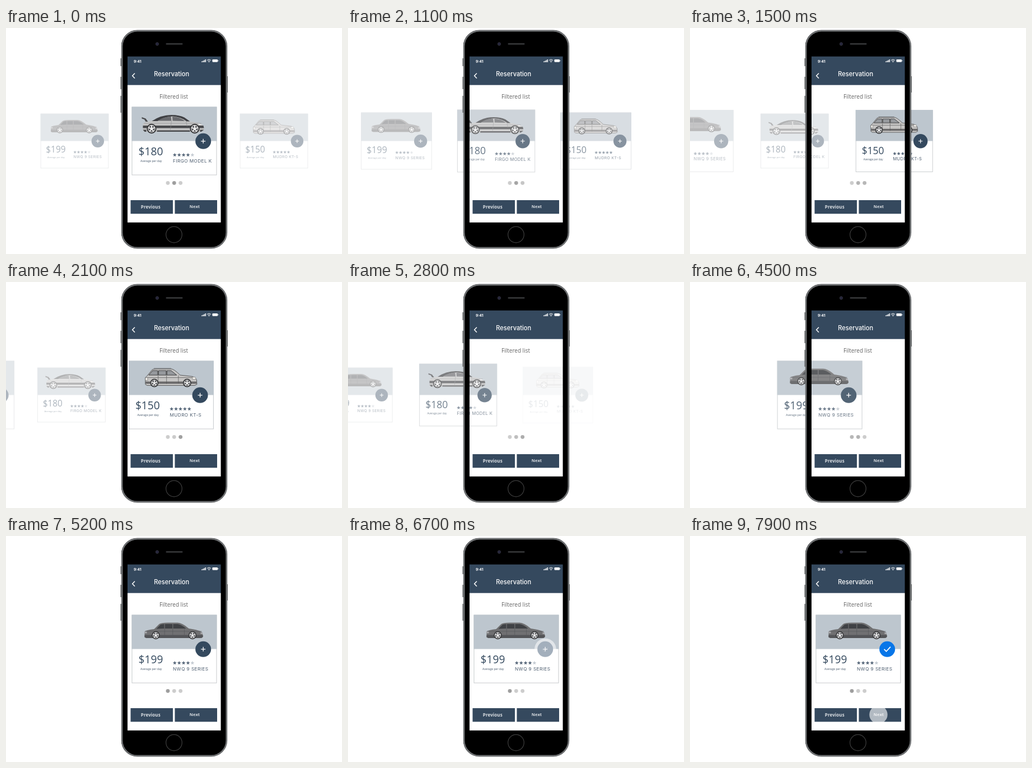
An HTML page that plays this animation: 600 px wide and 403 px high, repeating every 8000 ms.

```html
<!DOCTYPE html>
<html lang="en">
<head>
<meta charset="utf-8">
<title>Reservation carousel</title>
<style>
  html, body { margin: 0; width: 100%; height: 100%; overflow: hidden; background: #fff; }
  svg { display: block; width: 100vw; height: 100vh; }
  text { font-family: "Open Sans", sans-serif; }
  .ui, .name { font-family: Inter, sans-serif; }
  .ui { fill: #fff; }
  .button { font-weight: 700; fill: #d9dde1; text-anchor: middle; letter-spacing: .1px; }
  .price { font-size: 19.2px; fill: #34495e; }
  .note { font-size: 5.1px; fill: #46586b; }
  .name { font-size: 8.2px; letter-spacing: .45px; fill: #4c5c6e; }
</style>
</head>
<body>
<svg viewBox="0 0 600 403">
  <defs>
    <g id="wheel">
      <circle r="8" fill="#333436"/>
      <circle r="5.7" fill="#55565a" stroke="#e6e6e6"/>
      <path d="M0 0V-5.500M0 0 5.200-1.700M0 0 3.200 4.500M0 0-3.200 4.500M0 0-5.200-1.700" stroke="#efefef" stroke-width="1.900"/>
    </g>
    <g id="limo">
      <path d="M-53-21V-31Q-50-34-36-35.500L-27-44.500Q-24-47-12-47H6Q14-47 26-36.500 46-34 50-29L51.500-22Q50-19.500 46-19.500H-50Z" fill="#707072"/>
      <path d="M-53-25H51V-22Q50-19.500 46-19.500H-50L-53-21Z" fill="#545558"/>
      <path d="M-32-36-25-43Q-23-44.500-18-44.500V-36.500ZM-16.500-44.500H-3.500V-36.500H-16.500ZM-2-44.500H6Q12-44 21-36.500H-2Z" fill="#3f4145"/>
      <path d="M-52-31.500H49M-17.200-44V-21M-2.800-44V-21M18-36V-22" fill="none" stroke="#58595c" stroke-width=".7"/>
      <path d="M47-30 50.500-28.500V-26.500H47ZM-53-31H-49V-28H-53Z" fill="#a9aaad"/>
      <use href="#wheel" transform="translate(-33 -24.500) scale(.9)"/>
      <use href="#wheel" transform="translate(32.500 -24.500) scale(.9)"/>
    </g>
    <g id="coupe">
      <path d="M-56-19V-30Q-55-33-49-34L-36-37Q-22-46.500-5-46.500 9-46.500 18-42L28-35Q46-33 52-27L53-20 48-16.500H-53Z" fill="#c3c3c3"/>
      <path d="M-58-42.500-51-40-47-34.500H-51L-53.500-38.500-58-40Z" fill="#4a4b4d"/>
      <path d="M-40-35.500Q-24-46.500-5-46.500 9-46.500 18-42L28-35 22-35Q12-43-3-44-18-43.500-30-35.500Z" fill="#3f4044"/>
      <path d="M-29-36Q-19-43.500-6-43.500L-5-36ZM-3.500-43.500Q10-43 19-35.500L-3-36Z" fill="#696a6e"/>
      <path d="M-56-27.500H52L53-23H-56ZM-31-19H28V-16.500H-31ZM46-20H53L48-16.500H46ZM-56-20H-50V-16.500H-53Z" fill="#48494c"/>
      <path d="M-54-31.500H48M-5-36-7-20M21-35 23-26" fill="none" stroke="#88898b" stroke-width=".6"/>
      <path d="M43-31.500 50-28.500H44Z" fill="#f0f0f0"/>
      <use href="#wheel" transform="translate(-40.500 -22) scale(1.080)"/>
      <use href="#wheel" transform="translate(36.500 -22) scale(1.080)"/>
    </g>
    <g id="hatch">
      <path d="M-46-19V-31L-43-34-34-45Q-32-46.500-27-46.500H0Q5-46.500 16-35.500L38-33Q44-31 45.500-27L46-19 42-17H-43Z" fill="#c6c5c4" stroke="#4c4c4d" stroke-width=".9"/>
      <path d="M-40-35.500-33-43.500H-24V-35.500ZM-22.500-43.500H-9V-35.500H-22.500ZM-7.500-43.500H0L10-35.500H-7.500Z" fill="#96999d" stroke="#3e3f41" stroke-width="1"/>
      <path d="M-46-24H46V-20H-46Z" fill="#6a696a"/>
      <path d="M-45-31H43M-23.200-43V-20M-8.200-43V-20M13-35V-21M-31-47.500H0" fill="none" stroke="#555" stroke-width=".7"/>
      <path d="M38-32H43L44.500-28H38ZM-46-31H-42V-26H-46Z" fill="#f0eee9" stroke="#555" stroke-width=".5"/>
      <use href="#wheel" transform="translate(-30 -21.500) scale(.93)"/>
      <use href="#wheel" transform="translate(28.500 -21.500) scale(.93)"/>
    </g>
    <clipPath id="screen"><path d="M217 51H384V347H217Z"/></clipPath>
  </defs>

  <rect x="216" y="50" width="168" height="51.700" fill="#35495e"/>
  <text class="ui" x="228" y="61.500" font-size="6.700" font-weight="700">9:41</text>
  <g fill="#fff">
    <path d="M349 59.500H350.500V61H349ZM351.200 58.500H352.700V61H351.200ZM353.400 57.200H354.900V61H353.400ZM355.600 56H357.100V61H355.600Z"/>
    <rect x="368.500" y="56" width="9.500" height="4.800" rx="1.200"/>
    <rect x="378.500" y="57.500" width="1" height="1.800"/>
    <path d="M359 57.800Q362.500 54.600 366 57.800M360.500 59.300Q362.500 57.500 364.500 59.300" fill="none" stroke="#fff" stroke-width="1"/>
    <circle cx="362.500" cy="60.500" r=".8"/>
  </g>
  <path d="M230 80.700 225.700 85.200 230 89.700" fill="none" stroke="#fff" stroke-width="1.500"/>
  <text class="ui" x="295.700" y="86.200" font-size="11.100" font-weight="500" text-anchor="middle">Reservation</text>
  <text x="299.500" y="125.500" font-size="10" fill="#666" text-anchor="middle">Filtered list</text>

  <g id="dots"></g>
  <path d="M222.500 307H298V331.200H222.500ZM301.500 307H377V331.200H301.500Z" fill="#35495e"/>
  <text class="button" x="258.300" y="321.500" font-size="8">Previous</text>
  <text class="button" x="337" y="321" font-size="7.500">Next</text>

  <g id="cards"></g>
  <circle id="touch" fill="#fff" clip-path="url(#screen)"/>

  <path d="M204.500 54H207V68H204.500ZM204.500 87H207V109H204.500ZM204.500 121H207V151H204.500ZM393.500 86H396V115H393.500Z" fill="#66686a"/>
  <path d="M234 4H366A28 28 0 0 1 394 32V365A28 28 0 0 1 366 393H234A28 28 0 0 1 206 365V32A28 28 0 0 1 234 4ZM217 50.700V346.800H383.600V50.700Z" fill-rule="evenodd"/>
  <rect x="207.200" y="5" width="186.600" height="387" rx="27.500" fill="none" stroke="#5f6163" stroke-width="2.800"/>
  <rect x="207.200" y="5" width="186.600" height="387" rx="27.500" fill="none" stroke="#808284" stroke-width="1"/>
  <circle cx="270" cy="28.500" r="2.700" fill="#24243a" stroke="#363640" stroke-width=".8"/>
  <rect x="285.500" y="27" width="30" height="2.800" rx="1.400" fill="#333436"/>
  <circle cx="300" cy="368.500" r="14.300" fill="none" stroke="#3e3e3e" stroke-width="1.200"/>
</svg>

<script>
const LOOP = 8000, STEP = 100;
const CENTER = 300.5, MIDDLE = 201.5, SPACING = 178, MOVE_TIME = 1230;
const SMALL = 0.8, PALE = 0.4;

const cars = [
  { shape: 'limo', price: '$199', name: 'NWQ 9 SERIES', stars: 4 },
  { shape: 'coupe', price: '$180', name: 'FIRGO MODEL K', stars: 4 },
  { shape: 'hatch', price: '$150', name: 'MUDRO KT-S', stars: 5 }
];

// grow, show, shrink and fade are rates relative to the length of the move.
const moves = [
  { start: 916, from: 1, to: 2, grow: 1.13, show: 2.1, shrink: 2.8, fade: 2.9, left: PALE },
  { start: 2420, from: 2, to: 1, grow: 1.85, show: 1.5, shrink: 2.8, fade: 2.9, left: 0 },
  { start: 3940, from: 1, to: 0, grow: 2.2, show: 1.65, shrink: 2.8, fade: 5, left: 0 }
];

const $ = id => document.getElementById(id);
const clamp = v => Math.max(0, Math.min(1, v));
const mix = (a, b, k) => a + (b - a) * clamp(k);
const ramp = (t, a, b) => clamp((t - a) / (b - a));
// Almost linear, runs slightly past the goal and returns.
const overshoot = x => x * (1.35 - 0.35 * x ** 6);

function star(cx, cy, r) {
  const points = Array.from({ length: 10 }, (_, i) => {
    const a = i * Math.PI / 5, d = i % 2 ? r * 0.45 : r;
    return `${(cx + d * Math.sin(a)).toFixed(2)},${(cy - d * Math.cos(a)).toFixed(2)}`;
  });
  return points.join(' ');
}

function cardMarkup({ shape, price, name, stars }) {
  const rating = [0, 1, 2, 3, 4].map(i =>
    `<polygon points="${star(0.8 + 7.9 * i, 24.8, 3.6)}" fill="${i < stars ? '#5b6b7d' : '#c6ccd3'}"/>`).join('');
  return `<g class="card">
    <rect x="-75.5" y="-60.500" width="151" height="121" fill="#fff" stroke="#c6c9cc"/>
    <rect x="-76" y="-61" width="152" height="61" fill="#bdc6ce"/>
    <use href="#${shape}"/>
    <text class="price" x="-64" y="25.500">${price}</text>
    <text class="note" x="-60.5" y="37.500">Average per day</text>
    ${rating}
    <text class="name" x="-2.500" y="38.500">${name}</text>
    <g transform="translate(51.700 .3)" fill="none" stroke="#fff">
      <circle class="badge" r="14" fill="#34495e" stroke="none"/>
      <path class="plus" d="M-4 0H4M0-4V4" stroke-width="1.300"/>
      <path class="tick" d="M-5.500 0-1.700 4 5.800-4.200" stroke-width="1.800" opacity="0"/>
    </g>
  </g>`;
}

$('cards').innerHTML = cars.map(cardMarkup).join('');
$('dots').innerHTML = [289, 300.3, 311.7].map(x => `<circle cx="${x}" cy="276.300" r="3.400"/>`).join('');
const cards = [...document.querySelectorAll('.card')];
const dots = [...$('dots').children];
const badge = cards[0].querySelector('.badge');
const plus = cards[0].querySelector('.plus');
const tick = cards[0].querySelector('.tick');

function pose(i, move, x, t) {
  if (i === move.to) return [mix(SMALL, 1, move.grow * x), mix(PALE, 1, move.show * x)];
  if (i === move.from) return [mix(1, SMALL, move.shrink * x), mix(1, move.left, move.fade * x)];
  if (i === 2) return [SMALL, 0];
  // The far left card swells with the first move, then settles back.
  const swell = move === moves[0] ? clamp(move.grow * x) * (1 - ramp(t, 2125, 2420)) : 0;
  return [mix(SMALL, 1, swell), PALE];
}

function drawCarousel(t) {
  const move = moves.filter(m => t >= m.start).pop() || moves[0];
  const x = ramp(t, move.start, move.start + MOVE_TIME);
  const focus = move.from + (move.to - move.from) * overshoot(x);
  cards.forEach((card, i) => {
    const [scale, opacity] = pose(i, move, x, t);
    card.setAttribute('transform', `translate(${CENTER + (i - focus) * SPACING} ${MIDDLE}) scale(${scale})`);
    card.setAttribute('opacity', opacity);
  });
  const active = mix(move.from, move.to, x);
  dots.forEach((dot, i) => {
    const gray = Math.round(mix(205, 158, 1 - Math.abs(i - active)));
    dot.setAttribute('fill', `rgb(${gray},${gray},${gray})`);
  });
}

function drawSelection(t) {
  const k = ramp(t, 6650, 7300);
  const channel = (a, b) => Math.round(mix(a, b, k));
  badge.setAttribute('fill', `rgb(${channel(52, 8)},${channel(73, 118)},${channel(94, 232)})`);
  plus.setAttribute('opacity', 1 - k);
  tick.setAttribute('opacity', k);
}

function drawTouch(t) {
  const onNext = t >= 7600;
  const [x, y] = onNext ? [336.5, 318.5] : [352.4, 202];
  const radius = onNext ? mix(10, 16.2, ramp(t, 7650, 7900)) : mix(10, 23.5, ramp(t, 6250, 6900));
  const opacity = onNext
    ? 0.62 * ramp(t, 7650, 7900)
    : 0.62 * ramp(t, 6250, 6550) * (1 - ramp(t, 6650, 7100));
  Object.entries({ cx: x, cy: y, r: radius, opacity }).forEach(([key, v]) => $('touch').setAttribute(key, v));
}

function frame(now) {
  const t = Math.floor(now % LOOP / STEP) * STEP;
  drawCarousel(t);
  drawSelection(t);
  drawTouch(t);
  requestAnimationFrame(frame);
}
frame(0);
</script>
</body>
</html>
```
